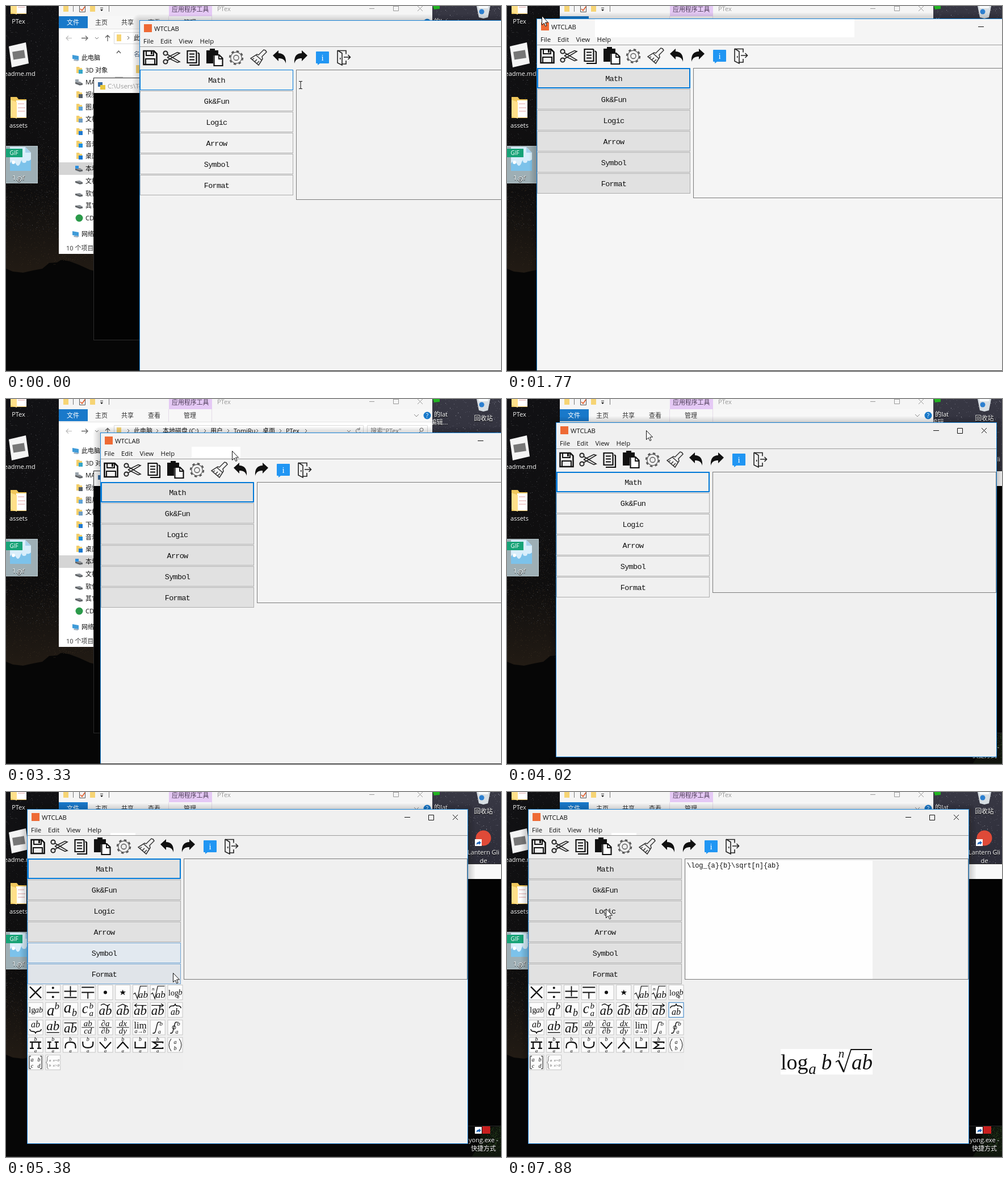
An HTML page that plays this animation: 872x642 px, repeating every 8000 ms.

```html
<!DOCTYPE html>
<html lang="zh">
<head>
<meta charset="utf-8">
<title>WTCLAB</title>
<style>
html, body { margin: 0; width: 100%; height: 100%; overflow: hidden; background: #060606; }
svg { display: block; width: 872px; height: 642px; }
text { font-family: "Open Sans", "Noto Sans CJK SC", "Noto Sans CJK", sans-serif; white-space: pre; }
.mono { font-family: "Liberation Mono", monospace; }
.serif { font-family: "Liberation Serif", serif; }
.it { font-family: "Liberation Serif", serif; font-style: italic; }
.mid { text-anchor: middle; }
</style>
</head>
<body>
<svg id="stage" viewBox="0 0 872 642"></svg>
<script>
const LOOP = 8000;
const R = (x, y, w, h, fill, more = '') => `<rect x="${x}" y="${y}" width="${w}" height="${h}" fill="${fill}" ${more}/>`;
const C = (x, y, r, fill, more = '') => `<circle cx="${x}" cy="${y}" r="${r}" fill="${fill}" ${more}/>`;
const T = (x, y, s, size = 11, fill = '#111', cls = '') =>
  `<text x="${x}" y="${y}" font-size="${size}" fill="${fill}" class="${cls}">${s.replace(/&/g, '&amp;').replace(/>/g, '&gt;')}</text>`;
const L = (d, width = 1, color = '#111', more = '') => `<path d="${d}" fill="none" stroke="${color}" stroke-width="${width}" ${more}/>`;
const F = (d, fill = '#111', more = '') => `<path d="${d}" fill="${fill}" ${more}/>`;
const G = (x, y, body) => `<g transform="translate(${x} ${y})">${body}</g>`;

let seed = 7;
const rnd = () => (seed = seed * 16807 % 2147483647) / 2147483647;
function specks(x, y, w, h, n, color) {
  let d = '';
  while (n--) d += `M${Math.floor(x + rnd() * w)} ${Math.floor(y + rnd() * h)}h1v1h-1z`;
  return F(d, color);
}

// Desktop
const folder = (x, y) => G(x, y,
  F('M0 0h11l3 4h14v33H0z', '#f0c75c') + F('M10 6h18v30H10z', '#fff') +
  L('M13 12h11M13 19h13M13 25h12', 1, '#e2a0a0') + F('M0 5l11 4v29L0 34z', '#ffe08a'));
const shortcut = (x, y) => R(x, y, 12, 12, '#fff') + F(`M${x + 3} ${y + 10}q-1-5 4-5v-2l4 3-4 4v-2q-3 0-4 2z`, '#1c63b8');
const label = (x, y, s) => T(x, y + 1, s, 11, '#000', 'mid') + T(x, y, s, 11, '#fff', 'mid');

const desktop =
  R(0, 0, 872, 642, '#060606') +
  `<defs><linearGradient id="dusk" x2="0" y2="1"><stop offset="0" stop-color="#111114"/><stop offset=".7" stop-color="#0f0e0e"/><stop offset="1" stop-color="#221b14"/></linearGradient>
  <linearGradient id="sky" x2="0" y2="1"><stop offset="0" stop-color="#383844"/><stop offset="1" stop-color="#2c2c38"/></linearGradient></defs>` +
  F('M0 0H160V467L148 464 128 455 112 449 98 446 90 451 76 452 64 462 48 465 30 469 12 467 0 462z', 'url(#dusk)') +
  specks(0, 0, 93, 400, 900, '#29292b') + specks(0, 250, 93, 206, 500, '#30261b') +
  specks(93, 436, 61, 12, 60, '#30261b') + specks(0, 0, 93, 400, 60, '#55555a') +
  R(745, 0, 127, 128, 'url(#sky)') + specks(751, 0, 121, 127, 260, '#555562') + specks(751, 0, 121, 127, 50, '#8d8d98') +
  F('M820 642l8-12 10-28 14-12 20-3v55z', '#10170d') + specks(848, 590, 24, 44, 130, '#29451f') +
  folder(8, -23) + label(22, 31, 'PTex') +
  G(22, 86, F('M-17-15l30-7 5 37-30 7z', '#f4f4f4') + R(-10, -7, 21, 14, '#777', 'transform="rotate(-9)"')) +
  label(22, 123, 'readme.md') + folder(8, 160) + label(22, 214, 'assets') +
  R(0, 246, 56, 66, '#9eafb5') + L('M0 246.5H55.5V311.5H0', 1, '#bccbd0') +
  F('M7 248h27l10 10v32H7z', '#d9eefb') + F('M34 248v10h10z', '#a9d3ee') +
  F('M7 290v-13q5-8 10 0 4 8 8 0 3-10 9-7 4 5 10 0v20z', '#7cc2ea') +
  C(13, 275, 3, '#fff') + C(32, 272, 4, '#d9eefb') +
  R(0, 251, 29, 15, '#17a377') + T(14, 262, 'GIF', 10, '#fff', 'mid') + label(22, 306, '1.gif') +
  F('M752 0h12v5l-10 1z', '#21b421') + label(766, 31, '的lat') + label(763, 45, '编辑...') +
  F('M829 0h24l-4 20-8 2-8-2z', '#d7dee3') + F('M832 0h18l-1 4h-16z', '#f7f9fa') + C(838, 10, 4.5, '#2c7fd0') +
  label(841, 38, '回收站') + C(841, 81, 13.5, '#df4a38') + shortcut(826, 83) +
  label(841, 110, 'Lantern Gli') + label(841, 125, 'de') +
  R(839, 588, 14, 13, '#c81f1f') + shortcut(826, 589) + label(841, 616, 'yong.exe -') + label(841, 631, '快捷方式');

// File manager
const nav = [['此电脑', 91, '#3f9bd8'], ['3D 对象', 113, '#35a6c9'], ['MA', 134, '#9aa4ac'], ['视频', 156, '#55606a'],
  ['图片', 178, '#5fa3d8'], ['文档', 199, '#6f9cc4'], ['下载', 221, '#1f78d0'], ['音乐', 243, '#1b8fe0'],
  ['桌面', 264, '#1477d1'], ['本地磁盘', 286, '#2a8fe0'], ['文档', 308, ''], ['软件', 330, ''], ['其它', 351, ''],
  ['CD', 373, 'disc'], ['网络', 401, '#3f9bd8']];
function navItem([name, y, tint], i) {
  const top = i === 0 || i === 14, x = top ? 133 : 140;
  let icon;
  if (tint === 'disc') icon = C(129, y, 6.5, '#2b9a4a');
  else if (top) icon = F(`M117 ${y - 5}l11 2v7l-11-2z`, tint) + F(`M120 ${y + 3}l9 1-3 2-7-1z`, '#9ab');
  else if (!tint || i === 9 || i === 2) icon = F(`M122 ${y}l8-1 5 3v3l-5 1-8-3z`, '#8a8f94') + L(`M122 ${y + 1}l8 3 5-1`, 1, '#333') + (tint ? R(122, y - 5, 6, 5, tint) : '');
  else icon = F(`M124 ${y - 6}h5l1 2h4v9h-10z`, '#f3cf6b') + R(128, y - 1, 7, 7, tint);
  return icon + T(x, y + 4, name);
}
const crumbs = [['此电脑', 225], ['本地磁盘 (C:)', 276], ['用户', 360], ['TomiRu', 401], ['桌面', 452], ['PTex', 493]];
const explorer =
  R(93, 0, 658, 436, '#fff') + R(93, 0, 658, 18, '#f5f5f5') + R(93, 18, 658, 22, '#f7f7f7') +
  R(287, 0, 76, 18, '#e5c9f5') + T(292, 10, '应用程序工具', 10.9, '#4b3a55') + L('M286.5 18V40M362.5 18V40', 1, '#e4dce8') +
  T(372, 9, 'PTex', 11, '#999') + T(313, 33, '管理', 11, '#333') +
  R(101, 0, 9, 10, '#f6d474') + R(148, 0, 9, 10, '#f6d474') + L('M118.5 0V10M181.5 0V10', 1, '#777') +
  L('M129.5-3V10.5H139.5V-3', 1, '#555') + L('M131 5l3 3 5-7', 1.6, '#e05a28') + L('M166 3.5h5', 1, '#333') + F('M166 6h5l-2.5 3z') +
  L('M640 4.5h9M682.5 0V8.5H691.5V0M682 .5h9M725 0l9 9M734 0l-9 9', 1, '#999') +
  R(93, 18, 51, 21, '#1979ca') + T(107, 33, '文件', 11, '#fff') +
  T(157, 33, '主页', 11, '#333') + T(203, 33, '共享', 11, '#333') + T(250, 33, '查看', 11, '#333') +
  L('M719 27l4 4 4-4', 1, '#888') + C(742, 29, 6.5, '#1979ca') + T(742, 33, '?', 10, '#fff', 'mid') +
  L('M93 40.5H751', 1, '#e2e2e2') +
  L('M116 56.5h-10M110 52.5l-4 4 4 4', 1.2, '#bbb') + L('M133 56.5h11M140 52.5l4 4-4 4M179 62V51M175 55.5l4-4 4 4', 1.3, '#666') + L('M157 55l3 3 3-3', 1, '#777') +
  L('M190.5 46.5H629.5V66.5H190.5zM636.5 46.5H742.5V66.5H636.5z', 1, '#d9d9d9') + R(195, 50, 8, 12, '#f6d474') +
  crumbs.map(([s, x]) => T(x, 60, s) + L(`M${x - 11} 53l3 3-3 3`, 1, '#555')).join('') + L('M527 53l3 3-3 3', 1, '#555') +
  L('M601 55l3 3 3-3M623 53a4 4 0 1 0 1 5M623 50v4h-4', 1, '#777') + T(642, 60, '搜索"PTex"', 11, '#777') + L('M728 59l3-3', 1, '#666') + C(732, 54, 3, 'none', 'stroke="#666"') +
  L('M195 83l3.5-4 3.5 4', 1.3, '#555') + T(225, 89, '名称', 11, '#4a6079') + R(229, 104, 9, 14, '#f6d474') +
  R(192, 124, 14, 3, '#cfcfcf') + R(93, 275, 100, 22, '#d5d5d5') + nav.map(navItem).join('') + T(106, 430, '10 个项目', 11, '#333');

const terminal =
  R(154, 126, 760, 462, '#2c2c2c') + R(155, 127, 758, 26, '#f8f8f8') + R(155, 153, 758, 434, '#030303') +
  R(162, 134, 8, 8, '#3b6ea5') + R(166, 139, 9, 8, '#e9c63c') + T(179, 145, 'C:\\Users\\TomiRu', 11.5, '#999');

// Toolbar, relative to the window corner
const undo = 'M235 62l10-9v5c9 0 14 6 13 18-2-7-6-9-13-9v5z';
const toolbar =
  L('M7.5 54h18l5 5v19h-23z', 2.6) + L('M12 54v8h13v-8M11 78V68h16v10', 2) + R(20, 55, 3, 5, '#111') +
  C(46, 58, 3.6, 'none', 'stroke="#222" stroke-width="2"') + C(46, 73, 3.6, 'none', 'stroke="#222" stroke-width="2"') +
  L('M49 60l22 13-4 1.5-18-9M49 71l22-13-4-1.5-18 9', 1.6, '#222') +
  L('M84.5 54h15l1 1v20h-16z', 2.2) + L('M88 59.5h9M88 64.5h9M88 69.5h9', 1.8) + L('M103 57l2 2v20h-17', 2.2) +
  F('M118 53h6v-3h9v3h6v9h-9v14h-12z') + L('M131.5 61h9l6 6v13h-15z', 2.2, '#111', 'style="fill:#fff"') + L('M140 61v7h6', 1.8) +
  C(170.5, 66, 9.8, 'none', 'stroke="#555" stroke-width="1.2"') + C(170.5, 66, 11.5, 'none', 'stroke="#555" stroke-width="2.5" stroke-dasharray="4.5 4.53"') + C(170.5, 66, 4.5, 'none', 'stroke="#555" stroke-width="1.3"') +
  L('M222 53l-3-1-9 9-3-1-11 7 14 12 7-11-1-4 8-8zM205 61l10 9M199 69l3-2M203 73l4-4M207 76l4-4', 1.5, '#333') +
  F(undo) + F(undo, '#111', 'transform="translate(531 0) scale(-1 1)"') +
  F('M312 55h21q1 0 1 1v19q0 1-1 1h-15l-4 3v-3h-2q-1 0-1-1V56q0-1 1-1z', '#2196f3') + T(322.5, 71, 'i', 15, '#fff', 'serif mid') +
  L('M349 53.5h15v6M364 71v6h-8M349 53v22l8 4V58l-8-5M360 65h11M367.5 61l4 4-4 4', 1.6, '#222') + R(353, 66, 1.5, 3, '#222');

// Symbol palette, each cell drawn around its centre
const it = (x, y, s, size = 15) => T(x, y, s, size, '#111', 'it mid');
const ab = (y = 9, s = 23) => it(0, y, 'ab', s);
const frac = (a, b) => it(0, -2, a, 15) + L('M-11 0H11') + it(0, 11, b, 15);
const big = d => it(0, -7, 'b', 10) + L(d, 2.2) + it(0, 13, 'a', 9);
const brace = 'M-10 0q0-4 5-4t5-4q0 4 5 4t5 4';
const bounds = it(6, -3, 'b', 11) + it(3, 11, 'a', 10);
const root = L('M-12 3l3-2 4 10 5-22H12', 1.2) + it(5, 9, 'ab', 17);
const cells = [
  L('M-10-10L10 10M10-10L-10 10', 2.4), L('M-11 0H11', 2) + C(0, -8, 2, '#111') + C(0, 8, 2, '#111'),
  L('M0-11V7M-11-2H11M-11 9H11', 1.8), L('M-11-9H11M-11 0H11M0 0V11', 1.8), C(0, 0, 3, '#111'),
  F('M0-5l1.3 3.5h4l-3 2.2 1.2 4-3.5-2.4-3.5 2.4 1.2-4-3-2.2h4z'),
  root, root + it(-8, -4, 'n', 9),
  T(-12, 5, 'log', 14, '#111', 'serif') + it(5, 10, 'a', 9) + it(9, 4, 'b', 14),
  T(-12, 5, 'lg', 15, '#111', 'serif') + it(6, 5, 'ab', 14), it(-4, 10, 'a', 27) + it(7, -1, 'b', 17), it(-5, 5, 'a', 27) + it(7, 11, 'b', 18),
  it(-5, 6, 'c', 25) + it(6, -2, 'b', 15) + it(6, 11, 'a', 15), ab() + L('M-8-8q4-4 8-1t8-1', 1.3), ab() + L('M-9-6l9-4 9 4', 1.3),
  ab() + L('M11-8H-10M-6-11l-4 3 4 3', 1.3), ab() + L('M-11-8H10M6-11l4 3-4 3', 1.3), ab(9, 16) + L(brace, 1.6, '#111', 'transform="translate(0 -3)"'),
  ab(0, 16) + L(brace, 1.6, '#111', 'transform="translate(0 3) scale(1 -1)"'), ab(5) + L('M-11 9H11', 1.4), ab() + L('M-11-8H11', 1.4),
  frac('ab', 'cd'), frac('∂a', '∂b'), frac('dx', 'dy'), T(0, 2, 'lim', 17, '#111', 'serif mid') + it(0, 10, 'a→b', 10),
  L('M4-9q-4-2-5 4l-3 12q-1 4-5 3', 1.4) + bounds, L('M4-9q-4-2-5 4l-3 12q-1 4-5 3', 1.4) + C(-2, 0, 3, 'none', 'stroke="#111"') + bounds,
  big('M-10-5H10M-10 6H-3M3 6H10M-6-5V6M6-5V6'), big('M-10 6H10M-10-5H-3M3-5H10M-6-5V6M6-5V6'),
  big('M-9 6V2q0-7 9-7t9 7v4'), big('M-9-6v4q0 7 9 7t9-7v-4'), big('M-10-5L0 6 10-5'), big('M-10 6L0-5 10 6'),
  big('M-9-6V5H9V-6'), big('M9-3V-5H-8L0 0-8 6H9V4'),
  L('M-7-11q-8 11 0 22M7-11q8 11 0 22') + it(0, -2, 'a', 10) + it(0, 9, 'b', 10),
  L('M-8-11h-3v22h3M8-11h3v22h-3') + it(-6, -2, 'a', 10) + it(6, -2, 'b', 10) + it(-6, 9, 'c', 10) + it(6, 9, 'd', 10),
  L('M-8-11q-3 0-2 5 0 5-2 6 2 1 2 6-1 5 2 5', 1, '#666') + T(-7, -2, 'a  x=0', 7, '#555', 'it') + T(-7, 7, 'b  x>0', 7, '#555', 'it')];
const cellX = i => 15 + i % 9 * 30.75, cellY = i => 322.5 + Math.floor(i / 9) * 30.8;
const palette = R(1, 308, 274, 151, '#efefef') + cells.map((body, i) =>
  G(cellX(i), cellY(i), R(-13, -13, 26, 26, '#fcfcfc', `stroke="#c6c6c6" id="cell${i}"`) + body)).join('');

const names = ['Math', 'Gk&Fun', 'Logic', 'Arrow', 'Symbol', 'Format'];
const buttons = names.map((s, i) => R(1.5, 87.5 + 37 * i, 269, 35, '#e1e1e1', `id="btn${i}"`) +
  `<g letter-spacing="-.7">${T(136, 109.5 + 37 * i, s, 13.5, '#111', 'mono mid')}</g>`).join('') +
  `<rect id="focus" x="2" y="88" width="268" height="34" fill="none" stroke="#0078d7" stroke-width="2"/>`;

const logPart = T(482, 488, 'log', 38, '#111', 'serif') + it(538, 496, 'a', 27) + it(563, 488, 'b', 37);
const rootPart = it(589, 467, 'n', 21) + L('M579 475l5-3', 1.5) + L('M584 472l9 20', 3) + L('M593 493l13-40H643', 1.8) + it(625.5, 488, 'ab', 37);

const shadow = [2, 4, 6, 8, 10, 12].map(n => `<rect class="shade" data-n="${n}" fill="#000" opacity=".03" rx="${n}"/>`).join('');
const appWindow = `<g id="win">${shadow}<rect id="frame" fill="#1883d7"/><rect id="body" x="1" y="1"/>` +
  `<g id="trail"></g>` + R(8, 7, 14, 14, '#ee6a35') + T(26, 18.5, 'WTCLAB', 11.3) +
  ['File', 'Edit', 'View', 'Help'].map((s, i) => T([7, 37, 69.5, 106.5][i], 41, s, 11.4)).join('') +
  `<path id="rule" stroke="#9c9c9c"/>` + toolbar + buttons +
  `<rect id="editor" x="276.5" y="87.5" fill="none" stroke="#7a7a7a"/>` +
  `<g id="caps">${L('M-112 14.5h10M-69.5 10.5h9v9h-9zM-27 10l9 9M-18 10l-9 9', 1)}</g>` +
  `<g id="palette">${palette}</g></g>`;
const result = `<g id="result">${R(315, 121, 329, 208, '#fefefe')}<g letter-spacing="-.1">${T(317, 132.5, '', 12, '#111', 'mono').replace('<text', '<text id="code"')}</g>
  <g id="formula">${R(482, 452, 162, 45, '#fff', 'id="paper"')}${logPart}<g id="root">${rootPart}</g></g></g>`;
const cursors = `<g id="cursor">${F('M.5.5V16.5L4.2 13 6.7 18.5 9 17.5 6.6 12H11.5z', '#fff', 'stroke="#111" id="arrow"')}` +
  L('M-3-6.5h2.5l.5 1 .5-1H3M0-6V6M-3 6.5h2.5l.5-1 .5 1H3', 1, '#111', 'id="beam"') +
  F('M-7-7h6l-2 2 8 8 2-2v6H1l2-2-8-8-2 2z', '#fff', 'stroke="#111" id="sizer"') + '</g>';

document.getElementById('stage').innerHTML = desktop + explorer + terminal + appWindow + result + cursors + R(0, 641, 872, 1, '#2a2a2a');

const $ = id => document.getElementById(id);
const set = (el, attrs) => { for (const k in attrs) el.setAttribute(k, attrs[k]); };
const show = (id, on) => set($(id), { visibility: on ? 'visible' : 'hidden' });
const shades = [...document.querySelectorAll('.shade')];

const bursts = [[0, 0, 1], [120, 1050, 8], [1170, 2160, 8], [2280, 3210, 8], [3330, 4290, 8],
  [4420, 5380, 8], [5510, 6440, 8], [6590, 7370, 7], [7640, 7880, 3]];
function snap(t) {
  const [a, b, n] = bursts.filter(k => k[0] <= t).pop();
  const step = (b - a) / (n - 1) || 1;
  return a + step * Math.min(n - 1, Math.floor((t - a + 3) / step));
}
function at(keys, t) {
  if (t <= keys[0][0]) return keys[0].slice(1);
  const i = keys.findIndex(k => k[0] > t);
  if (i < 0) return keys[keys.length - 1].slice(1);
  const p = keys[i - 1], q = keys[i], u = (t - p[0]) / (q[0] - p[0]);
  return p.slice(1).map((v, j) => Math.round(v + (q[j + 1] - v) * u));
}

// Three drags: move left, shrink from the top left corner, move left again
const DRAG1 = 660, DRAG2 = 2280, DRAG3 = 3680;
const place = [[DRAG1, 235, 25], [784, 195, 24], [1050, 52, 22], [DRAG2, 52, 22], [3140, 166, 59], [DRAG3, 166, 59], [4220, 37, 30]];
const size = [[DRAG2, 890, 626, 228], [3140, 777, 589, 212]];
const pointer = [[0, 519, 139], [519, 753, 44], [DRAG1, 753, 44], [784, 712, 43], [1050, 569, 41],
  [1170, 600, 36], [1453, 600, 36], [1594, 155, 21], [1736, 61, 17], [1877, 12, 2], [2160, 52, 22],
  [DRAG2, 52, 22], [3140, 166, 59], [3210, 327, 84], [3330, 398, 91], [3600, 325, 73], [DRAG3, 325, 73], [4220, 196, 44], [4290, 185, 71],
  [4420, 216, 88], [4560, 232, 126], [4960, 235, 135], [5246, 285, 285], [5380, 294, 318], [5900, 294, 347],
  [6590, 294, 347], [6850, 262, 352], [7000, 262, 352], [7370, 298, 377], [7640, 257, 320], [7880, 174, 205]];
// White marks left by the pointer: from, until, box
const trails = [[1590, DRAG2, 155, 23, 457, 32], [3330, DRAG3, 327, 84, 86, 20], [4420, LOOP, 184, 72, 44, 4]];

function draw(time) {
  const t = snap(time);
  const [x, y] = at(place, t), [w, h, boxH] = at(size, t), [cx, cy] = at(pointer, t);
  const open = t >= 4900, pale = t < DRAG1 || (t >= DRAG3 && !open);
  const body = t < DRAG1 ? '#f2f2f2' : t < DRAG2 ? '#f5f5f5' : t < DRAG3 ? '#f3f3f3' : '#f0f0f0';

  set($('win'), { transform: `translate(${x} ${y})` });
  shades.forEach(s => { const n = +s.dataset.n; set(s, { x: -n, y: -n + 2, width: w + 2 * n, height: h + 2 * n }); });
  set($('frame'), { width: w, height: h });
  set($('body'), { width: w - 2, height: h - 2, fill: body });
  set($('rule'), { d: `M1 46.5H${w - 1}` });
  set($('editor'), { width: w - 278, height: boxH });
  set($('caps'), { transform: `translate(${w} 0)` });
  const trail = trails.find(k => t >= k[0] && t < k[1]);
  $('trail').innerHTML = trail ? R(trail[2] - x, trail[3] - y, trail[4], trail[5], '#fff') : '';

  const hover = open && t < 6000 ? Math.floor((cy - 117) / 37) : -9;
  names.forEach((_, i) => {
    const now = i === hover, lit = i && (now || i === hover - 1);
    set($('btn' + i), {
      fill: lit ? (now ? '#e0e4e9' : '#e2e9f0') : pale ? body : '#e1e1e1',
      stroke: i === 0 && t < DRAG1 ? '#0078d7' : lit ? '#6fa3d2' : '#adadad'
    });
  });
  show('focus', t >= DRAG1 && t < 6300);

  show('palette', open);
  const picked = t < 5880 ? -1 : t < 6750 ? 8 : t < 7200 ? 7 : 17;
  [7, 8, 17].forEach(i => set($('cell' + i), { stroke: i === picked ? '#2c7dc4' : '#c6c6c6' }));

  const rooted = t >= 6960;
  show('result', t >= 6590);
  $('code').textContent = '\\log_{a}{b}' + (rooted ? '\\sqrt[n]{ab}' : '');
  set($('root'), { display: rooted ? 'inline' : 'none' });
  set($('paper'), { width: rooted ? 162 : 91 });
  set($('formula'), { transform: `translate(${rooted ? 0 : 36} 0)` });

  const beam = t < 120, sizer = t >= 2100 && t < 3150;
  set($('cursor'), { transform: `translate(${cx} ${cy})` });
  show('beam', beam);
  show('sizer', sizer);
  show('arrow', !beam && !sizer);
}

const start = performance.now();
function tick() {
  draw((performance.now() - start) % LOOP);
  requestAnimationFrame(tick);
}
tick();
</script>
</body>
</html>
```
